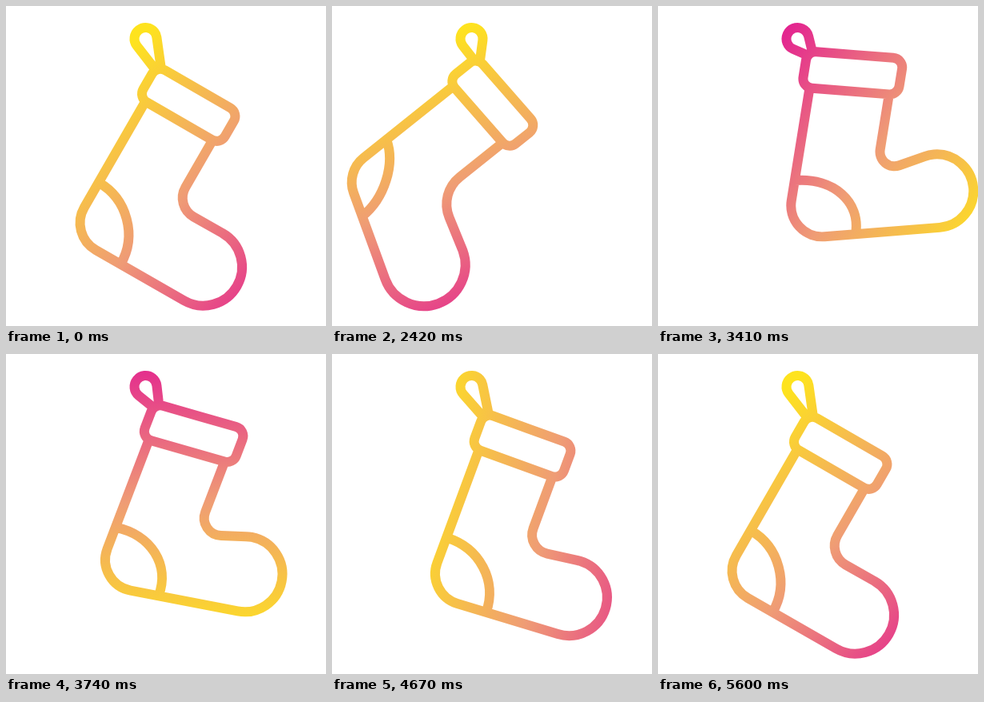
An HTML page with a canvas that plays this animation: 400x400 px, repeating every 5.63 s.

```html
<!DOCTYPE html>
<html>
<head>
<meta charset="utf-8">
<style>
  html, body { margin: 0; width: 100%; height: 100%; overflow: hidden; background: #fff; }
  canvas { display: block; }
</style>
</head>
<body>
<canvas id="stage" width="400" height="400"></canvas>
<script>
const ctx = document.getElementById('stage').getContext('2d');
const LOOP = 5630, START = 2000, END = 5600;
const RING = { x: 174.5, y: 41, r: 14 };

// Turning points of the damped swing; angles in degrees, lift in pixels.
const REST = { leg: 30, shear: 0, bend: 0, lift: 0 };
const SWING = [
  { time: START, ...REST },
  { time: 2640, leg: 59, shear: 3.5, bend: 43, lift: 14 },
  { time: 3440, leg: 9, shear: 4.7, bend: -27, lift: 18 },
  { time: 4180, leg: 42.5, shear: 5.4, bend: 9, lift: 3 },
  { time: 4765, leg: 18.8, shear: 0, bend: -9, lift: 1 },
  { time: 5250, leg: 32.5, shear: 0, bend: 2, lift: 0 },
  { time: END, ...REST }
];

const rad = deg => deg * Math.PI / 180;

function swingAt(t) {
  const i = SWING.findIndex(k => k.time >= t);
  if (i < 1) return REST;
  const from = SWING[i - 1], to = SWING[i];
  const s = (1 - Math.cos(Math.PI * (t - from.time) / (to.time - from.time))) / 2;
  const mix = name => from[name] + (to[name] - from[name]) * s;
  return { leg: mix('leg'), shear: mix('shear'), bend: mix('bend'), lift: mix('lift') };
}

// Angle on circle c where the line from p touches it.
function touch(p, c, side) {
  const dx = p.x - c.x, dy = p.y - c.y;
  return Math.atan2(dy, dx) + side * Math.acos(Math.min(1, c.r / Math.hypot(dx, dy)));
}

const onCircle = (c, a) => ({ x: c.x + c.r * Math.cos(a), y: c.y + c.r * Math.sin(a) });

// The gradient turns once around while the sock swings.
function setGradient(t, c) {
  const p = Math.min(1, Math.max(0, (t - START) / (END - START)));
  const x = p + 0.1 * Math.sin(Math.PI * p);
  const angle = rad(44 + 360 * x * x * (3 - 2 * x));
  const dx = 178 * Math.cos(angle), dy = 178 * Math.sin(angle);
  const g = ctx.createLinearGradient(c.x - dx, c.y - dy, c.x + dx, c.y + dy);
  g.addColorStop(0, '#fee31e');
  g.addColorStop(0.5, '#ef9c75');
  g.addColorStop(1, '#e3268f');
  ctx.strokeStyle = g;
}

function draw(t) {
  const { leg, shear, bend, lift } = swingAt(t);
  const tilt = leg - 30;
  const px = 188.6 - 0.2 * tilt - 0.2 * lift - 0.5 * shear, py = 74.4 - lift;
  const ca = Math.cos(rad(leg - shear)), sa = Math.sin(rad(leg - shear));
  const cb = Math.cos(rad(leg)), sb = Math.sin(rad(leg));
  const at = (u, v) => ({ x: px + u * ca - v * sb, y: py + u * sa + v * cb });
  const move = p => ctx.moveTo(p.x, p.y);
  const line = p => ctx.lineTo(p.x, p.y);
  const corner = (p, q, r) => ctx.arcTo(p.x, p.y, q.x, q.y, r);

  ctx.fillStyle = '#fff';
  ctx.fillRect(0, 0, 400, 400);
  ctx.lineWidth = 12;
  setGradient(t, at(118, 95));
  ctx.beginPath();

  // Hanging loop
  const left = at(0, 5), right = at(6, 0);
  move(left);
  ctx.arc(RING.x, RING.y, RING.r, touch(left, RING, 1), touch(right, RING, -1));
  line(right);

  // Cuff
  const width = 118 - 0.1 * bend;
  const box = [at(0, 0), at(width, 0), at(width, 46), at(0, 46)];
  move(at(width / 2, 0));
  for (let i = 1; i <= 4; i++) corner(box[i % 4], box[(i + 1) % 4], 12);
  ctx.closePath();

  // Leg and foot
  const shorten = 0.95 * Math.max(0, tilt);
  const heel = at(10, 238 - shorten);
  const ankle = at(width - 11, 141 + 0.2 * Math.abs(bend)), legEnd = at(width - 11, 46);
  const toe = { ...at(176 - 0.45 * bend, 189 + bend), r: 48.5 + 0.1 * bend };
  const soleAngle = touch(heel, toe, -1), sole = onCircle(toe, soleAngle);
  move(at(10, 46));
  corner(heel, sole, 39);
  ctx.arc(toe.x, toe.y, toe.r, soleAngle, touch(ankle, toe, 1), true);
  corner(ankle, legEnd, 27 * Math.exp(0.015 * bend));
  line(legEnd);

  // Heel patch
  const rise = 75 - shorten / 2;
  const run = (75 - bend / 2) / Math.hypot(sole.x - heel.x, sole.y - heel.y);
  const patch = (m, n) => [
    heel.x + rise * sb * m + (sole.x - heel.x) * run * n,
    heel.y - rise * cb * m + (sole.y - heel.y) * run * n
  ];
  ctx.moveTo(...patch(1, 0));
  ctx.bezierCurveTo(...patch(1, 0.55), ...patch(0.55, 1), ...patch(0, 1));

  ctx.stroke();
}

const begin = performance.now();
function tick() {
  draw((performance.now() - begin) % LOOP);
  requestAnimationFrame(tick);
}
tick();
</script>
</body>
</html>
```
